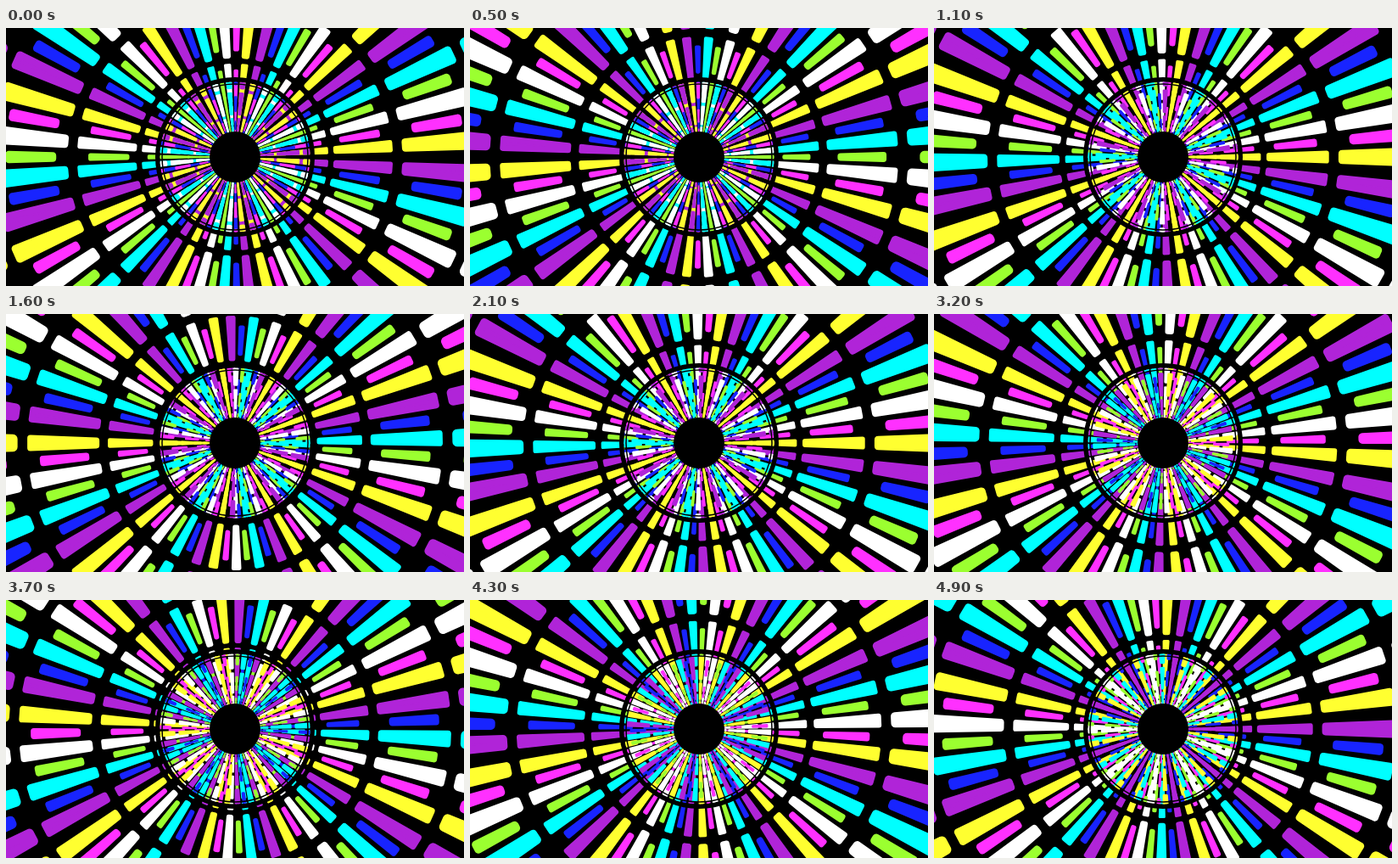
An HTML page with a canvas for the animation above (5 s loop, 540x304 px).

```html
<!DOCTYPE html>
<html lang="en">
<head>
<meta charset="utf-8">
<title>Light tunnel</title>
<style>
  html, body { margin: 0; width: 100%; height: 100%; overflow: hidden; background: #000; }
  canvas { display: block; width: 540px; height: 304px; }
</style>
</head>
<body>
<canvas id="stage" width="540" height="304"></canvas>
<script>
const ctx = document.getElementById('stage').getContext('2d');
const RAD = Math.PI / 180;
const COLORS = ['#ffff30', '#ff30ff', '#ffffff', '#9bff30', '#00ffff', '#1824ff', '#b024d8'];
const SECTORS = 9;
const SECTOR = 360 / SECTORS;
const STEP = SECTOR / 7.5;
const BAR_DEPTH = 0.885;
const INNER_SCALE = 0.325;

// Distance from the centre at a given depth: slow far away, steady when near
function radius(depth) {
  const x = depth - 0.25;
  return 115.8 + 70 * x + 32 * Math.hypot(x, 0.5);
}

// Tapered radial bar with rounded corners, pointing right
function bar(r0, r1, halfAngle) {
  const c = 0.018 * (r0 + r1) / 2;
  const t = Math.tan(halfAngle * RAD);
  const a = r0 + c, b = r1 - c;
  const ha = a * t - c, hb = b * t - c;
  ctx.lineWidth = 2 * c;
  ctx.beginPath();
  ctx.moveTo(a, -ha);
  ctx.lineTo(b, -hb);
  ctx.lineTo(b, hb);
  ctx.lineTo(a, ha);
  ctx.closePath();
  ctx.fill();
  ctx.stroke();
}

function tunnel(phase) {
  ctx.lineJoin = 'round';
  for (let ring = -2; ring <= 2; ring++) {
    const near = ring + phase;
    for (let s = 0; s < SECTORS; s++) {
      COLORS.forEach((color, i) => {
        const narrow = i % 2;
        const inset = narrow ? 0.14 : 0;
        ctx.save();
        ctx.rotate((SECTOR * (phase + s) - 4 - STEP * i) * RAD);
        ctx.fillStyle = ctx.strokeStyle = color;
        bar(radius(near + inset), radius(near + BAR_DEPTH - inset), narrow ? 1.55 : 2.25);
        ctx.restore();
      });
    }
  }
}

function circle(r) {
  ctx.beginPath();
  ctx.arc(0, 0, r, 0, 2 * Math.PI);
}

function disc(r) {
  ctx.fillStyle = '#000';
  circle(r);
  ctx.fill();
}

function draw(phase) {
  ctx.setTransform(1, 0, 0, 1, 0, 0);
  ctx.fillStyle = '#000';
  ctx.fillRect(0, 0, 540, 304);
  ctx.translate(270, 152);
  tunnel(phase);
  disc(94);

  // Two smaller tunnels, one mirrored over the other, seen through the opening
  ctx.save();
  circle(88.5);
  ctx.clip();
  ctx.scale(INNER_SCALE, INNER_SCALE);
  tunnel(phase);
  ctx.scale(-1, 1);
  tunnel(phase + 0.5);
  ctx.restore();

  ctx.strokeStyle = '#000';
  ctx.lineWidth = 1.5;
  circle(86);
  ctx.stroke();
  disc(30);
}

let shown = -1;
function frame() {
  const step = Math.floor(performance.now() / 100) % 10;
  if (step !== shown) draw((shown = step) / 10);
  requestAnimationFrame(frame);
}
frame();
</script>
</body>
</html>
```
